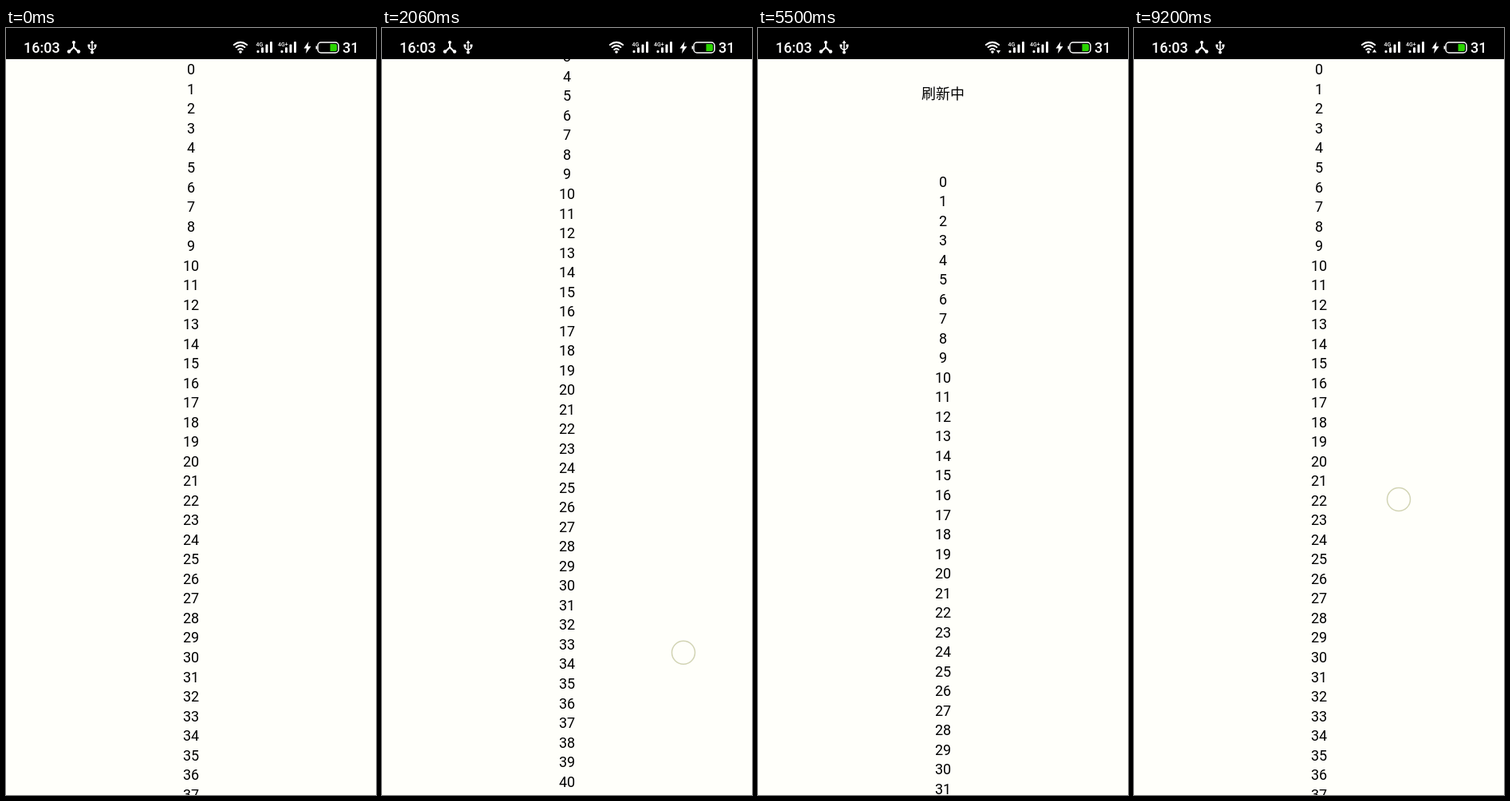
Animation of 464x960 px, one loop 9240 ms. Source, as an HTML page:

```html
<!DOCTYPE html>
<html lang="zh">
<head>
<meta charset="utf-8">
<title>Pull to refresh</title>
<style>
html, body { margin: 0; width: 100%; height: 100%; overflow: hidden; background: #fffffa; }
svg { display: block; width: 464px; height: 960px; }
text { font: 18px Roboto, sans-serif; fill: #000; }
.middle { text-anchor: middle; }
.label { font: 18px "Noto Sans CJK SC", "Noto Sans CJK", sans-serif; }
.paper { fill: #fffffa; }
.status text { font-weight: 500; fill: #fff; }
.status .tiny { font-size: 7px; }
.line { fill: none; stroke: #fff; stroke-width: 2; stroke-linecap: round; stroke-linejoin: round; }
.thin { stroke-width: 1.5; }
.solid { fill: #fff; }
</style>
</head>
<body>
<svg viewBox="0 0 464 960">
  <rect class="paper" width="464" height="960"/>
  <text class="middle label" x="232" y="88.6">刷新中</text>
  <g id="list"><rect class="paper" y="39" width="464" height="2700"/></g>
  <circle id="touch" class="paper" r="14.5" stroke="#d2d4b4" stroke-width="1.5"/>
  <g class="status">
    <rect width="464" height="39"/>
    <text x="22" y="31">16:03</text>
    <path class="line" d="M85 18V24L79 30M85 24L91 30"/>
    <g class="solid">
      <circle cx="85" cy="18" r="2"/><circle cx="79" cy="29.5" r="2.2"/><circle cx="91" cy="29.5" r="2.2"/>
    </g>
    <path class="line thin" d="M108 18V30M104 22V25L108 28L112 25V22"/>
    <path class="solid" d="M108 15.5L110.5 19H105.5ZM102.5 20.5h3v3h-3ZM110.5 20.5h3v3h-3Z"/>
    <circle class="solid" cx="108" cy="30.5" r="2"/>
    <g id="wifi"><circle class="solid" cx="294" cy="30" r="1.8"/></g>
    <path id="traffic" class="solid" stroke="#000"/>
    <g id="signals" class="solid"></g>
    <text class="tiny" x="313.5" y="22.5">4G</text>
    <text class="tiny" x="341" y="22.5">4G+</text>
    <path class="solid" d="M379.5 17L373.5 25.5H377L376 32L382.5 23H378.7Z"/>
    <rect class="line thin" x="391" y="18" width="26" height="13" rx="4"/>
    <path class="solid" d="M390 22.5h-1.5v4h1.5Z"/>
    <path d="M406.5 20H413Q415 20 415 22V27Q415 29 413 29H406.5Z" fill="#2bd400"/>
    <text x="422" y="31">31</text>
  </g>
</svg>
<script>
const LOOP = 9240, ROWS = 100, PITCH = 24.52;
const PEAK = 1152, DEPTH = 235;

// Every swipe flings the list up, pulls it past the top and lets it spring back.
const swipes = [
  { start: 0, x: 388, y: 950 },
  { start: 1930, x: 382, y: 850 },
  { start: 3826, x: 380, y: 830 },
  { start: 6148, x: 365, y: 681 }
];
const RISE = 760, PULL = 1100, BOTTOM = 1500, REST = 1900;
const tug = { start: 8460, end: 9200, x: 332, y: 590, depth: 150 };

const $ = id => document.getElementById(id);
const clamp = v => Math.min(1, Math.max(0, v));
const progress = (t, from, to) => clamp((t - from) / (to - from));
const smooth = p => p * p * (3 - 2 * p);

function add(parent, tag, attrs, content = '') {
  const node = document.createElementNS('http://www.w3.org/2000/svg', tag);
  for (const key in attrs) node.setAttribute(key, attrs[key]);
  node.textContent = content;
  parent.append(node);
}

for (let i = 0; i < ROWS; i++) {
  add($('list'), 'text', { class: 'middle', x: 232, y: 58.4 + i * PITCH }, i);
}
for (const half of [2.7, 5.4, 8.1]) {
  const y = 30 - half * 1.1;
  add($('wifi'), 'path', { class: 'line', d: `M${294 - half} ${y}q${half} ${-half * 0.8} ${2 * half} 0` });
}
for (const x of [314.5, 344.5]) {
  for (let i = 0; i < 4; i++) {
    const height = 3 + i * 3.7;
    add($('signals'), 'rect', { x: x + i * 5.5, y: 31 - height, width: 3, height, rx: 1 });
  }
}

const swipeAt = t => swipes.findLast(swipe => swipe.start <= t);
const tugWave = t => Math.sin(Math.PI * progress(t, tug.start, tug.end));

function scrollAt(t) {
  const u = t - swipeAt(t).start;
  return PEAK * smooth(progress(u, 0, RISE))
    - (PEAK + DEPTH) * smooth(progress(u, PULL, BOTTOM))
    + DEPTH * smooth(progress(u, BOTTOM, REST))
    - tug.depth * tugWave(t);
}

const pressed = (t, down, up) => Math.min(progress(t, down, down + 100), 1 - progress(t, up, up + 60));

function touchAt(t) {
  if (t >= tug.start) {
    return { x: tug.x, y: tug.y + 110 * tugWave(t), alpha: pressed(t, tug.start, LOOP) };
  }
  const { start, x, y } = swipeAt(t);
  const u = t - start;
  if (u < PULL) return { x: 378, y: 860 - 253 * progress(u, 0, 420), alpha: pressed(u, 0, 420) };
  const left = 1 - progress(u, 1140, 1416);
  return { x, y: y - 90 * left * left, alpha: pressed(u, 1140, 1416) };
}

function trafficAt(t, offset) {
  if (t >= tug.start) return 'M301.5 26L305 31H298Z';
  return t > LOOP / 2 && offset < 0 ? 'M301.5 32.5L298 27.5H305Z' : '';
}

function draw(t) {
  const offset = scrollAt(t), { x, y, alpha } = touchAt(t);
  $('list').setAttribute('transform', `translate(0 ${-offset})`);
  $('touch').setAttribute('transform', `translate(${x} ${y})`);
  $('touch').setAttribute('opacity', alpha);
  $('traffic').setAttribute('d', trafficAt(t, offset));
}

// Three pictures per 100 ms, shown for 30, 30 and 40 ms.
const held = t => t - t % 100 + 30 * Math.min(2, Math.floor(t % 100 / 30));

const begin = performance.now();
function tick() {
  draw(held((performance.now() - begin) % LOOP));
  requestAnimationFrame(tick);
}
tick();
</script>
</body>
</html>
```
